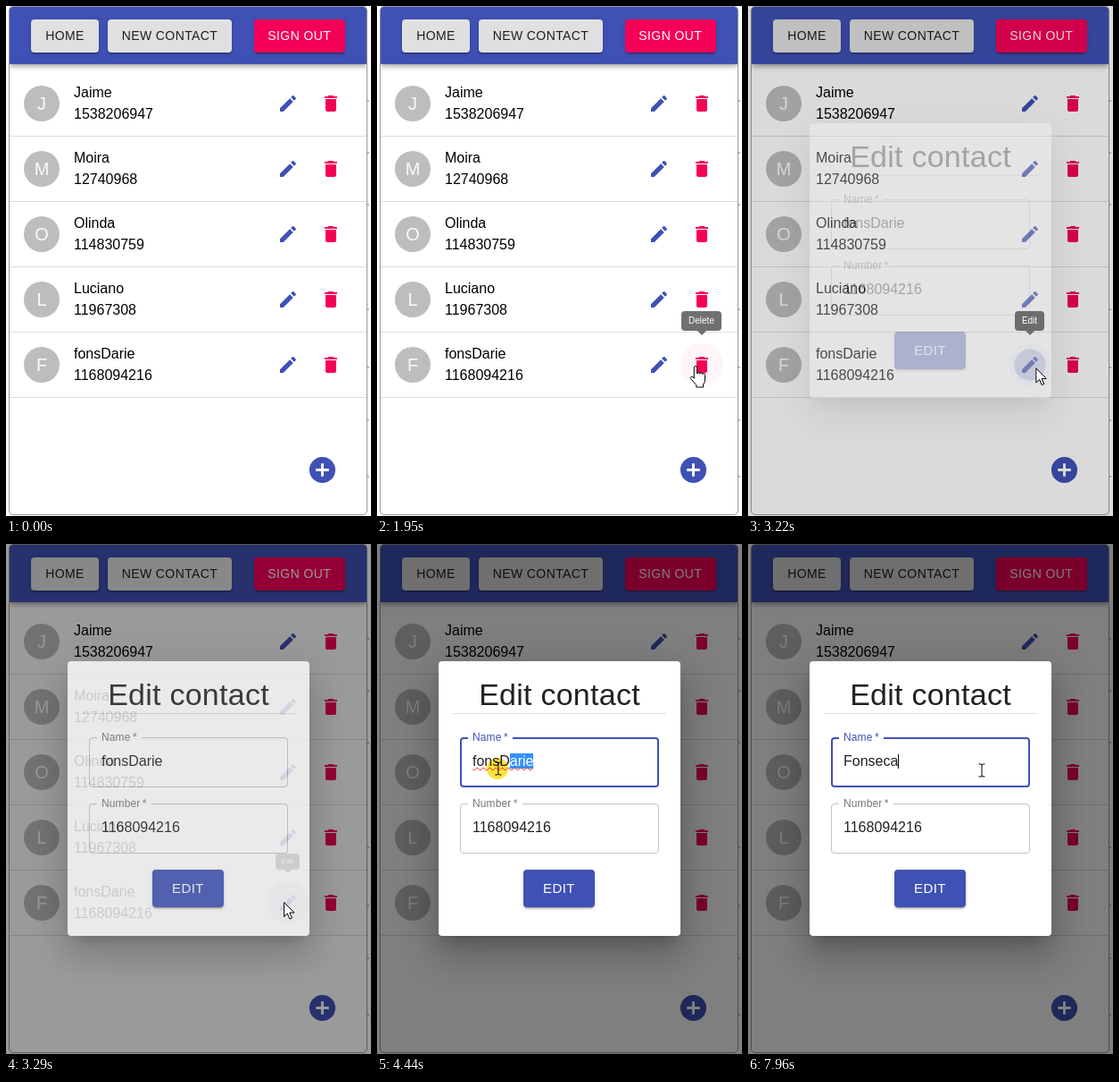
These frames come from a looping animation (409x570 px, 8000 ms). An HTML page:

```html
<!DOCTYPE html>
<html lang="en">
<head>
<meta charset="utf-8">
<title>Contacts</title>
<style>
  html, body { margin: 0; width: 100%; height: 100%; overflow: hidden; background: #fff; }
  body, #stage { font: 16px/24px "Liberation Sans", Arial, sans-serif; color: #000; }
  #stage { position: relative; width: 409px; height: 570px; overflow: hidden; }
  #stage div, #stage svg { position: absolute; box-sizing: border-box; white-space: nowrap; }
  #stage svg { overflow: visible; }
  .bar { background: #3f51b5; border-radius: 4px 4px 0 0; clip-path: inset(0 0 -20px);
    box-shadow: 0 2px 4px -1px #0003, 0 4px 5px #00000024, 0 1px 10px #0000001f; }
  .btn { border-radius: 4px; text-align: center; font-size: 14px; letter-spacing: .02857em; color: #fff;
    box-shadow: 0 3px 1px -2px #0003, 0 2px 2px #00000024, 0 1px 5px #0000001f; }
  .grey { background: #e0e0e0; color: #000000de; }
  .avatar { border-radius: 50%; background: #bdbdbd; color: #fafafa; font-size: 20px; text-align: center; }
  .tip { background: #616161e6; border-radius: 4px; color: #fff; font-size: 10px; text-align: center;
    transform-origin: 50% 120%; }
  .tip::after { content: ""; position: absolute; left: 50%; top: 100%; margin-left: -5px;
    border: 5px solid transparent; border-top-color: #616161e6; border-bottom: 0; }
  .hover { border-radius: 50%; }
  #dialog { background: #fff; border-radius: 4px; color: #000000de;
    box-shadow: 0 11px 15px -7px #0003, 0 24px 38px 3px #00000024, 0 9px 46px 8px #0000001f; }
  .title { font-size: 34px; letter-spacing: .00735em; text-align: center; border-bottom: 1px solid #ddd; }
  .field { border: 1px solid #0000003b; border-radius: 4px; }
  .label { padding: 0 5px; background: #fff; color: #0000008a; font-size: 12px; letter-spacing: .00938em; }
  .spell { text-decoration: underline wavy #e33 1px; text-underline-offset: 1px; text-decoration-skip-ink: none; }
  mark { background: #3390ff; color: #fff; }
  u { display: inline-block; width: 1px; height: 16px; margin-left: -.5px; vertical-align: -3px; background: #000; }
  #press { width: 24px; height: 24px; border-radius: 50%; background: #ffe23d; mix-blend-mode: multiply; }
</style>
</head>
<body>
<div id="stage"></div>
<script>
const BLUE = '#3f51b5', PINK = '#f50057';
const PENCIL = 'M3 17.25V21h3.75L17.81 9.94l-3.75-3.75L3 17.25zM20.71 7.04c.39-.39.39-1.02 0-1.41l-2.34-2.34c-.39-.39-1.02-.39-1.41 0l-1.83 1.83 3.75 3.75 1.83-1.83z';
const TRASH = 'M6 19c0 1.1.9 2 2 2h8c1.1 0 2-.9 2-2V7H6v12zM19 4h-3.5l-1-1h-5l-1 1H5v2h14V4z';
const PLUS = 'M12 2a10 10 0 1 0 0 20 10 10 0 0 0 0-20zm5 11h-4v4h-2v-4H7v-2h4V7h2v4h4v2z';
const CONTACTS = [['Jaime', '1538206947'], ['Moira', '12740968'], ['Olinda', '114830759'],
  ['Luciano', '11967308'], ['fonsDarie', '1168094216']];
const [OLD_NAME, NUMBER] = CONTACTS[4], NEW_NAME = 'Fonseca';
const TYPED = [5770, 6230, 6430, 6500, 6830, 7100, 7960];
// time, x, y of the pointer's hot spot
const PATH = [[560, 409, 522], [900, 372, 505], [1330, 314, 396], [1500, 315, 397], [1750, 350, 412],
  [1950, 357, 402], [2150, 357, 402], [2550, 323, 405], [3220, 323, 405], [3290, 312, 401],
  [3630, 178, 250], [4100, 178, 250], [4440, 136, 251], [4780, 96, 250], [4910, 96, 250], [5110, 262, 253]];
// centre, radius and colour of the round buttons
const SPOTS = [[316, 401, 24, BLUE], [364, 401, 24, PINK], [354.5, 518.5, 29, BLUE]];

const box = (x, y, w, h, attrs = '', text = '', css = '') =>
  `<div ${attrs} style="left:${x}px;top:${y}px;width:${w}px;height:${h}px;line-height:${h}px;${css}">${text}</div>`;
const icon = (x, y, size, color, d) =>
  `<svg style="left:${x}px;top:${y}px" width="${size}" height="${size}" viewBox="0 0 24 24" fill="${color}"><path d="${d}"/></svg>`;
const label = (y, text, id, w) => box(9 + 24, y, w, 12, `class="label" id="${id}"`, text + '\u2009*');

const rows = CONTACTS.map(([name, number], i) => {
  const y = 73 * i;
  return box(20, y + 89, 40, 40, 'class="avatar"', name[0].toUpperCase())
    + box(76, y + 85, 200, 24, '', name) + box(76, y + 109, 200, 24, '', number)
    + box(4, y + 145, 400, 1, '', '', 'background:#ddd')
    + icon(304, y + 97, 24, BLUE, PENCIL) + icon(352, y + 97, 24, PINK, TRASH);
}).join('');

const dialog = box(16, 16, 239, 43, 'class="title"', 'Edit contact')
  + box(24, 85, 223, 56, 'class="field" id="nameField"') + label(79, 'Name', 'nameLabel', 50)
  + box(38, 103, 190, 18, 'id="value"')
  + box(24, 159, 223, 56, 'class="field"') + label(153, 'Number', 'numberLabel', 61)
  + box(38, 177, 190, 18, '', NUMBER)
  + box(95, 233, 80, 42, 'class="btn"', 'EDIT', `background:${BLUE};font-size:15px`);

const stage = document.getElementById('stage');
stage.innerHTML = box(3, 0, 402, 569, '', '', 'border:1px solid #999;border-radius:5px')
  + [105, 163, 221, 338, 403, 462, 525].map(y => box(405, y, 2, 2, '', '', 'background:#bbb')).join('')
  + box(4, 1, 400, 64, 'class="bar"')
  + box(28, 15, 76, 36.5, 'class="btn grey"', 'HOME')
  + box(114, 15, 139, 36.5, 'class="btn grey"', 'NEW CONTACT')
  + box(277.5, 15, 102.5, 36.5, 'class="btn"', 'SIGN OUT', `background:${PINK}`)
  + SPOTS.map(([x, y, r, c], i) =>
      box(x - r, y - r, 2 * r, 2 * r, `class="hover" id="hover${i}"`, '', `background:${c}0a`)).join('')
  + rows + icon(337, 501, 35, BLUE, PLUS)
  + box(292, 377, 48, 48, 'id="ripple"', '', `background:${BLUE}44;border-radius:50%`)
  + box(0, 0, 409, 570, 'id="shade"', '', 'background:#00000080')
  + box(69, 131, 271, 307, 'id="dialog"', dialog)
  + box(299, 341, 33, 22, 'class="tip" id="editTip"', 'Edit')
  + box(341, 341, 45, 22, 'class="tip" id="deleteTip"', 'Delete')
  + '<div id="press"></div>'
  + `<svg id="pointer" width="1" height="1" style="left:0;top:0" fill="#fff" stroke="#000">
      <path id="arrow" d="M0 0V16l3.7-3.5 2.6 6 2.6-1.1-2.6-5.9H11.5z"/>
      <path id="hand" d="M-1.7 14V2.2a1.7 1.7 0 0 1 3.4 0V9a1.5 1.5 0 0 1 3 .2 1.5 1.5 0 0 1 3 .6 1.4 1.4 0 0 1 2.8.7V16q0 3-2 5v3H.8v-2.5Q-2.2 18-5.5 14.5c-1-1.6 1-3 2.4-1.8z"/>
      <path id="beam" fill="none" d="M-3.5-7H-1L0-6 1-7H3.5M0-6V6M-3.5 7H-1L0 6 1 7H3.5"/>
    </svg>`;

const el = id => document.getElementById(id);
const show = (id, on) => { el(id).style.opacity = +on; };
const ramp = (t, a, b) => Math.min(1, Math.max(0, (t - a) / (b - a)));
const smooth = p => p * p * (3 - 2 * p);

function pointerAt(t) {
  const i = PATH.findIndex(p => p[0] > t);
  if (i < 1) return PATH[i ? PATH.length - 1 : 0].slice(1);
  const [a, x, y] = PATH[i - 1], [b, x2, y2] = PATH[i], p = ramp(t, a, b);
  return [x + (x2 - x) * p, y + (y2 - y) * p];
}

function setTip(id, p) {
  show(id, p);
  el(id).style.transform = `scale(${.75 + .25 * p})`;
}

function nameHtml(t) {
  const typed = TYPED.filter(at => at <= t).length;
  if (typed) return NEW_NAME.slice(0, typed) + (t >= 7630 && t < 7960 ? '' : '<u></u>');
  if (t < 4100) return OLD_NAME;
  const cut = OLD_NAME.length - Math.min(OLD_NAME.length, Math.floor((t - 4100) / 75));
  return `<span class="spell">${OLD_NAME.slice(0, cut)}<mark>${OLD_NAME.slice(cut)}</mark></span>`;
}

function draw(t) {
  const [x, y] = pointerAt(t), modal = t >= 3080, focus = t >= 4100;
  let overButton = false;
  SPOTS.forEach(([cx, cy, r], i) => {
    const over = t >= 560 && t < 3400 && Math.hypot(x - cx, y - cy) < r;
    overButton ||= over;
    show('hover' + i, over);
  });
  const overField = t > 3290 && x > 93 && x < 316 && y > 216 && y < 272;
  show('pointer', t >= 560);
  el('pointer').style.transform = `translate(${x}px,${y}px)`;
  const kind = overField ? 'beam' : overButton && !modal ? 'hand' : 'arrow';
  for (const id of ['arrow', 'hand', 'beam']) show(id, id === kind);

  show('press', t >= 3010 && t < 3150 || t >= 4100 && t < 4910);
  el('press').style.transform = `translate(${x - 13}px,${y - 12}px)`;
  el('ripple').style.transform = `scale(${ramp(t, 3080, 3272)})`;
  show('ripple', 1 - ramp(t, 3200, 3400));

  setTip('editTip', t < 2000 ? ramp(t, 1390, 1500) - ramp(t, 1600, 1720)
    : ramp(t, 2400, 2550) - ramp(t, 3230, 3310));
  setTip('deleteTip', ramp(t, 1800, 1950) - ramp(t, 2200, 2350));

  const open = smooth(ramp(t, 3150, 3350));
  show('shade', open);
  show('dialog', open);
  el('nameField').style.border = focus ? `2px solid ${BLUE}` : `1px solid ${overField ? '#000000de' : '#0000003b'}`;
  el('nameLabel').style.color = focus ? BLUE : '';
  el('value').innerHTML = nameHtml(t);
}

function frame() {
  draw(performance.now() % 8000);
  requestAnimationFrame(frame);
}
frame();
</script>
</body>
</html>
```
